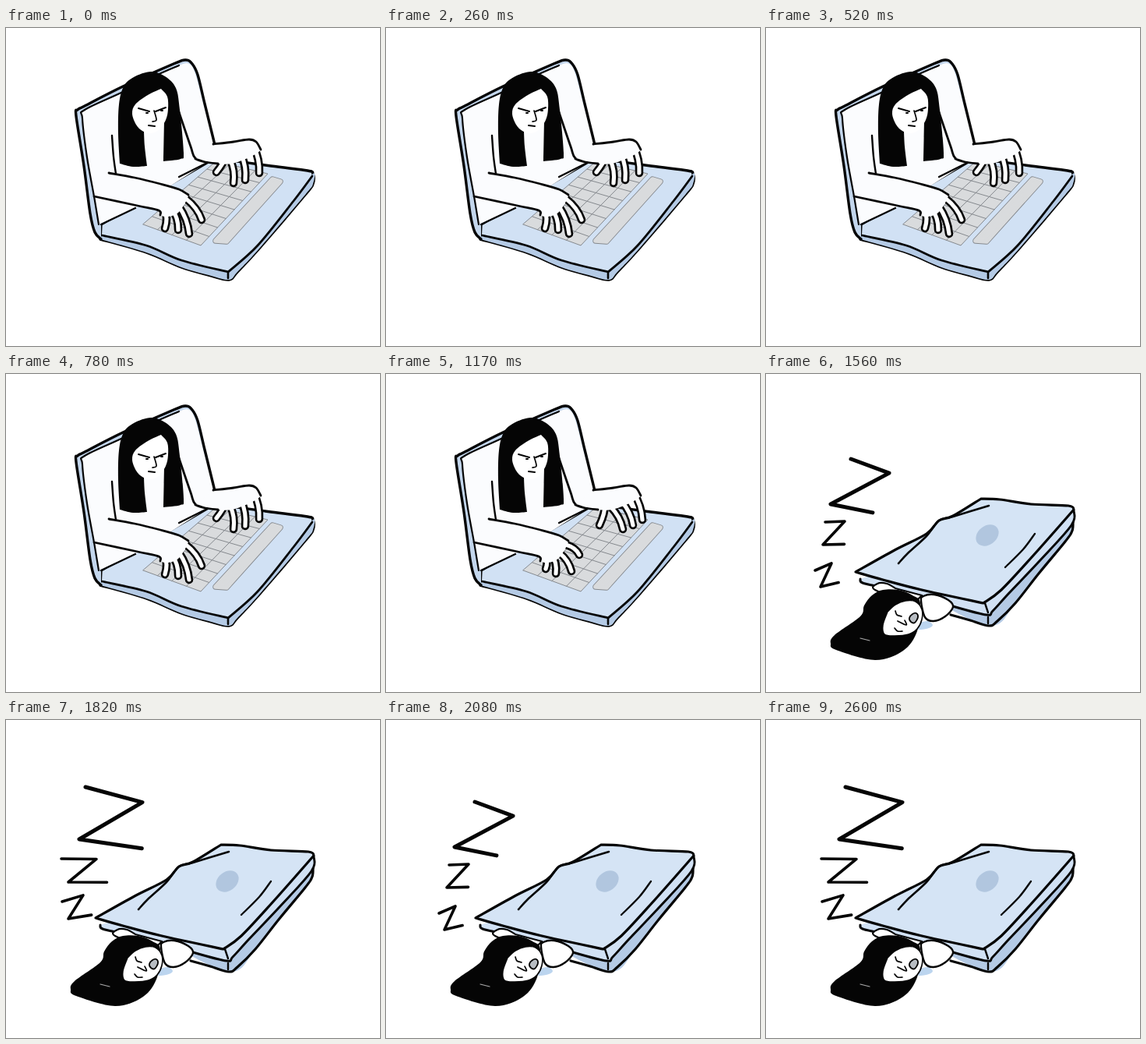
Write an HTML page that moves like this. It is 480 by 408 pixels and loops after 2.86 s.

```html
<!DOCTYPE html>
<html lang="en">
<head>
<meta charset="utf-8">
<title>Typing and sleeping</title>
<style>
  html, body { margin: 0; width: 100%; height: 100%; overflow: hidden; background: #fff; }
  svg { display: block; width: 100vw; height: 100vh; }
  path { stroke-linecap: round; stroke-linejoin: round; }
</style>
</head>
<body>
<svg id="stage" viewBox="0 0 480 408"></svg>
<script>
const NS = 'http://www.w3.org/2000/svg';
const stage = document.getElementById('stage');
const INK = '#050505', BLUE = '#d1e1f4', SIDE = '#b4cae5', KEY = '#d9dbdd', GREY = '#85898e', PAPER = '#fbfcfe';

function add(parent, tag, attrs = {}) {
  const el = document.createElementNS(NS, tag);
  for (const k in attrs) el.setAttribute(k, attrs[k]);
  parent.append(el);
  return el;
}
const group = parent => add(parent, 'g');
const mix = (p, q, t) => p.map((v, k) => v + (q[k] - v) * t);

// Smooth curve through points; a "!" marks a sharp corner.
function curve(text, closed) {
  const pts = text.trim().split(/\s+/).flatMap(s => {
    const p = s.replace('!', '').split(',').map(Number);
    return s.endsWith('!') ? [p, p] : [p];
  });
  const n = pts.length;
  const at = i => closed ? pts[(i + n) % n] : pts[Math.max(0, Math.min(n - 1, i))];
  let d = 'M' + pts[0];
  for (let i = 0; i < (closed ? n : n - 1); i++) {
    const [a, b, c, e] = [at(i - 1), at(i), at(i + 1), at(i + 2)];
    if (b === c) continue;
    const c1 = b.map((v, k) => v + (c[k] - a[k]) / 6);
    const c2 = c.map((v, k) => v - (e[k] - b[k]) / 6);
    d += `C${c1} ${c2} ${c}`;
  }
  return d + (closed ? 'Z' : '');
}
const stroke = (g, d, w, color = INK, fill = 'none') =>
  add(g, 'path', { d, fill, stroke: color, 'stroke-width': w });
const line = (g, pts, w = 2.8, color = INK) => stroke(g, curve(pts), w, color);
const blob = (g, pts, fill, w = 0) => stroke(g, curve(pts, true), w, INK, fill);

function drawKeys(g) {
  const a = [176, 252], b = [250, 279], c = [336, 187], d = [270, 171];
  let path = `M${a}L${b}L${c}L${d}Z`;
  for (let i = 1; i < 4; i++) path += `M${mix(a, b, i / 4)}L${mix(d, c, i / 4)}`;
  for (let i = 1; i < 8; i++) path += `M${mix(a, d, i / 8)}L${mix(b, c, i / 8)}`;
  stroke(g, path, 1, GREY, KEY);
  const bar = 'M269,273L342,194L352,197L283,274Z';
  stroke(g, bar, 7.5, GREY);
  stroke(g, bar, 5.7, KEY, KEY);
}

function drawLaptop(g) {
  const rim = '394,187 394,200 384,214 325,283 297,313 286,323 260,317 225,307 180,288 121,271!';
  blob(g, `122,252! 268,167! 340,177 387,183 ${rim}`, BLUE, 3.4);
  blob(g, `123,266! 180,279 225,298 285,313! 323,279 369,222 ${rim}`, SIDE);
  drawKeys(g);
  line(g, '123,266 180,279 225,298 285,313! 323,279 369,222 393,190');
  line(g, '285,313 285,321', 2.6);

  const shell = '122,271 114,262 108,238 100,177 90,113 92,105 101,100 150,75 215,46 231,41 239,46 246,60 255,97 268,150';
  stroke(g, curve(shell) + 'L250,176L122,252Z', 0, INK, '#c3d6ec');
  const inner = '119,252 113,216 104,166 98,116 101,105 150,82 190,62 ';
  stroke(g, curve(inner + '222,48 235,46 243,59 255,104 268,150') + 'L256,174L166,231Z', 0, INK, PAPER);
  line(g, shell, 3.4);
  line(g, inner + '222,48', 2.2);
  line(g, '122,252 166,231', 2.4);
  line(g, '222,191 256,174', 2.4);
}

function drawWoman(g) {
  line(g, '136,138 138,165 141,187', 2.4);
  line(g, '222,108 237,152 243,167 260,172');
  blob(g, '146,174! 144,135 145,98 151,75 164,63 186,56 204,62 218,77 223,105 228,160 224,168 ' +
    '202,171! 203,120! 177,133! 178,152 181,177! 163,178', INK);
  blob(g, '199,78! 182,86 166,98 162,110 167,124 175,132 185,135 196,131 205,118 208,104 207,88', '#fff');
  line(g, '170,103 184,107', 2);
  line(g, '192,107 205,102', 2);
  line(g, '180,109 182,109', 2);
  line(g, '199,106 201,106', 2);
  line(g, '190,106 193,118 188,120', 1.7);
  line(g, '183,125 191,126', 2);
}

// Fingers bend from the knuckles to one of two sets of tips.
const HANDS = [
  { top: '132,186 165,192 198,200 222,207 234,214', low: '198,240 196,234 169,228 113,216',
    palm: '222,236 208,242',
    knuckles: [[231, 219], [222, 229], [213, 232], [204, 235]],
    tips: [[[251, 246], [235, 264], [221, 259], [204, 257]], [[248, 232], [238, 253], [218, 256], [205, 250]]] },
  { top: '266,149 292,146 312,143 321,146 327,156', low: '272,174 256,172 243,168',
    palm: '312,166 290,174',
    knuckles: [[281, 167], [288, 170], [302, 163], [318, 153]],
    tips: [[[270, 185], [292, 199], [307, 195], [325, 186]], [[274, 194], [304, 199], [317, 194], [329, 187]]] }
];

function drawHand(g, hand, pose) {
  hand.knuckles.forEach((k, i) => {
    const tip = hand.tips[pose][i], [x, y] = mix(k, tip, 0.55);
    const d = `M${k}Q${x + 4},${y - 3} ${tip}`;
    stroke(g, d, 10.5);
    stroke(g, d, 5.2, '#fff');
  });
  stroke(g, curve(`${hand.top} ${hand.palm} ${hand.low}`), 0, INK, PAPER);
  line(g, hand.top);
  line(g, hand.low);
}

function drawBed(g) {
  const edge = '320,294 350,256 384,215 393,201 394,188';
  blob(g, `122,266! 200,282! 286,323 ${edge}! 276,170!`, SIDE);
  line(g, `237,309 262,316 286,323 297,317 ${edge}`, 3.2);
  const lip = '121,263 124,268 150,274 200,285 240,298 283,309 291,304 312,281 350,241 392,194 395,175';
  stroke(g, curve(lip), 3, INK, BLUE);
  blob(g, '115,254! 165,226 206,205 222,188 240,182 276,160! 300,161 340,167 388,169 395,174! ' +
    '342,234 302,277 279,294! 200,277 150,264', '#d5e4f5', 3.2);
  line(g, '281,294 285,306', 2.4);
  line(g, '285,312 285,320', 2.4);
  add(g, 'ellipse', { cx: 284, cy: 207, rx: 16, ry: 12, transform: 'rotate(-38 284 207)', fill: '#b1c6df' });
  line(g, '170,243 182,230 206,208 222,188 240,183 286,169', 2.6);
}

function drawSleeper(g) {
  blob(g, '190,325 198,319 208,317 214,322 209,326 198,328', '#bcd5ef');
  blob(g, '140,277 143,269 155,269 166,275! 200,284! 185,292', '#fff', 2.2);
  blob(g, '199,291 202,285 216,283 234,290 240,299 230,311 215,317 204,312', '#fff', 2.4);
  blob(g, '136,284 150,277 170,277 188,284 198,294 194,330 176,355 140,367 90,354 83,346 88,335 121,311 126,297', INK);
  blob(g, '156,305! 166,296 179,291 192,292 200,302 200,315 194,327 183,334 165,336 152,334 150,322', '#fff', 1.6);
  line(g, '166,304 168,309 174,311', 1.7);
  line(g, '165,326 169,330 175,330', 1.7);
  line(g, '169,317 180,322 178,316', 1.7);
  blob(g, '188,308 193,307 195,312 191,319 186,318 184,313', '#b7bcc2', 1.8);
  line(g, '121,339 133,342', 1.2, '#aaa');
}

function drawZ(g, x, y, w, h, slope, lean, weight = 3.6) {
  const foot = [x - lean, y + h];
  stroke(g, `M${x},${y}l${w},${slope * w}L${foot}l${w * 1.1},${slope * w * 0.6}`, weight);
}
function drawLowZs(g) {
  drawZ(g, 114, 105, 49, 58, 0.37, 26, 5);
  drawZ(g, 81, 186, 25, 29, -0.04, 3);
  drawZ(g, 68, 248, 21, 21, -0.43, -7);
}
function drawHighZs(g) {
  drawZ(g, 102, 86, 73, 67, 0.27, 8, 5);
  drawZ(g, 71, 178, 45, 30, 0.01, -9);
  drawZ(g, 72, 233, 27, 22, -0.3, -8);
}

// Faint dashes fanning out around the closing lid.
function drawRays(g) {
  [[411, 168], [416, 207], [382, 250], [351, 291], [319, 320], [281, 336]].forEach(([x, y], i) => {
    const turn = (i * 26 - 34) * Math.PI / 180;
    const ray = stroke(g, `M${x},${y}l${26 * Math.cos(turn)},${26 * Math.sin(turn)}`, 1.6, '#e8e8e8');
    ray.setAttribute('stroke-dasharray', '1 3');
  });
}

const awake = group(stage), asleep = group(stage);
drawLaptop(awake);
drawWoman(awake);
const poses = [0, 1].map(pose => {
  const g = group(awake);
  HANDS.forEach(hand => drawHand(g, hand, pose));
  return g;
});

drawBed(asleep);
drawSleeper(asleep);
const fold = line(asleep, '340,207 325,227 302,250', 2.4);
const lowZs = group(asleep), highZs = group(asleep), rays = group(asleep);
drawLowZs(lowZs);
drawHighZs(highZs);
drawRays(rays);

const LOOP = 2860, TYPE_END = 1300, TAP = 130, BREATH = 260;
const show = (el, on) => el.style.display = on ? '' : 'none';
const shift = (el, x, y) => el.setAttribute('transform', `translate(${x} ${y})`);

function render(ms) {
  const t = ms % LOOP, typing = t < TYPE_END;
  show(awake, typing);
  show(asleep, !typing);
  const tap = Math.floor(t / TAP) % 2;
  poses.forEach((g, i) => show(g, i === tap));

  const beat = Math.floor((t - TYPE_END) / BREATH), phase = beat % 3;
  const sway = phase === 1 ? 1 : 0;
  shift(lowZs, -5 * sway, 4 * sway);
  shift(fold, 5 * sway, -2 * sway);
  show(lowZs, phase < 2);
  show(highZs, phase === 2);
  show(rays, beat === 0);
}

const start = performance.now();
function tick() {
  render(performance.now() - start);
  requestAnimationFrame(tick);
}
tick();
</script>
</body>
</html>
```
